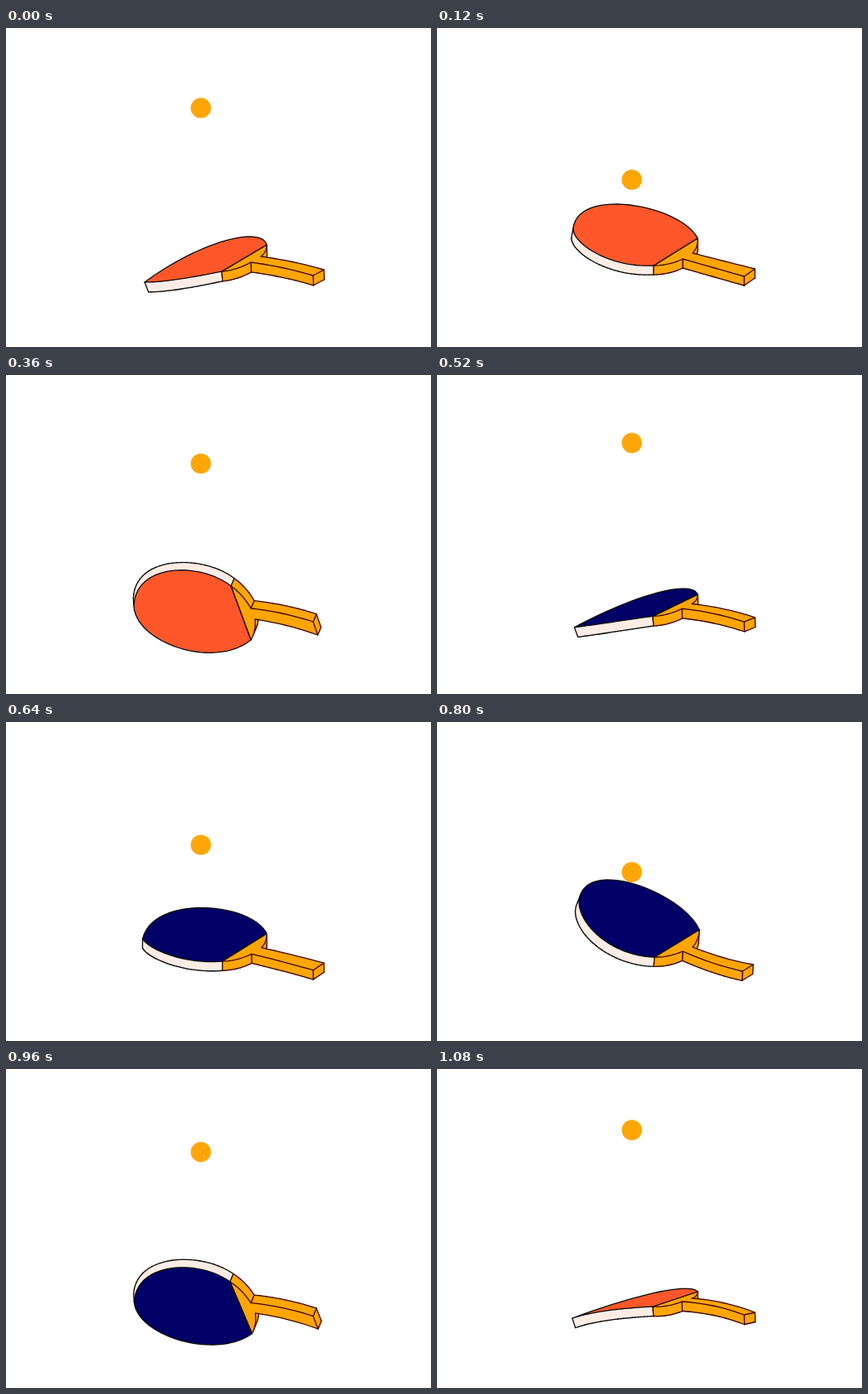
Animation of 512x384 px, one loop 1.12 s. Source, as an HTML page with a canvas:

```html
<!DOCTYPE html>
<html lang="en">
<head>
<meta charset="utf-8">
<title>Paddle and ball</title>
<style>
  html, body { margin: 0; width: 100%; height: 100%; overflow: hidden; background: #fff; }
  canvas { display: block; width: 512px; height: 384px; }
</style>
</head>
<body>
<canvas id="stage" width="512" height="384"></canvas>
<script>
const ctx = document.getElementById('stage').getContext('2d');
const LOOP = 1120, STEP = 40;
const RED = '#ff5729', NAVY = '#020066', WOOD = '#ffa500', RIM = '#fdece4';
const INK = '#0a0a0a', WOOD_INK = '#3c0500';

// A pose: outline of the facing side, walked counterclockwise.
// near joint, near neck, near end | far end, far neck, far joint |
// far curve handles, tip, near curve handles | thickness x, y, lean, handle bow
const flat = [260,286, 295,280, 370,296,  383,293, 307,276, 314,268,
  305,258, 250,268, 163,300, 190,291, 225,288,  .5,11.5, 3, -3];
const low = [260,293, 295,282, 370,298,  383,291, 307,275, 314,261,
  308,238, 235,256, 167,306, 195,306, 235,298,  .5,11.8, 4, -1.5];
const open = [261,286, 296,278, 370,299,  383,290, 308,271, 314,253,
  292,212, 168,191, 164,242, 165,261, 210,289,  0,11, -2, 0];
const high = [262,283, 296,276, 368,300,  381,292, 308,271, 316,250,
  296,205, 176,160, 171,216, 171,246, 213,282,  -.5,11.3, -4, 2];
const front = [287,316, 299,290, 373,309,  375,295, 301,278, 288,246,
  253,208, 154,195, 153,262, 153,322, 238,376,  2,-3, -4, 0];
const over = [295,319, 300,294, 375.5,313,  370,297, 295,281, 271,254,
  234,225, 156,226, 154,278, 156,322, 250,355,  4,-9.3, -4, -2];

const poses = [flat, low, open, high, front, over, flip(flat)];
const swings = [
  { from: 1080, length: 540, hit: 202, times: [0, 40, 160, 260, 350, 400, 540], side: RED, back: NAVY },
  { from: 500, length: 580, hit: 248, times: [0, 40, 180, 300, 390, 450, 580], side: NAVY, back: RED }
];

function point(pose, i) { return [pose[2 * i], pose[2 * i + 1]]; }

function shift(pose, [x, y]) {
  return [x + pose[22] + pose[24] * Math.max(0, 270 - x) / 100, y + pose[23]];
}

// The same paddle described from its other side.
function flip(pose) {
  const order = [5, 4, 3, 2, 1, 0, 10, 9, 8, 7, 6];
  return [...order.flatMap(i => shift(pose, point(pose, i))),
    -pose[22], -pose[23], -pose[24], pose[25]];
}

// Monotone cubic between the key poses.
function poseAt(times, t) {
  let i = 0;
  while (i < times.length - 2 && t >= times[i + 1]) i++;
  const h = times[i + 1] - times[i], s = (t - times[i]) / h;
  return flat.map((_, n) => {
    const slope = j => (poses[j + 1][n] - poses[j][n]) / (times[j + 1] - times[j]);
    const tangent = j => {
      if (j === 0) return slope(0);
      if (j === times.length - 1) return slope(j - 1);
      const a = slope(j - 1), b = slope(j);
      return a * b > 0 ? 2 * a * b / (a + b) : 0;
    };
    const a = poses[i][n], b = poses[i + 1][n], s2 = s * s, s3 = s2 * s;
    return a * (2 * s3 - 3 * s2 + 1) + b * (3 * s2 - 2 * s3)
      + h * (tangent(i) * (s3 - 2 * s2 + s) + tangent(i + 1) * (s3 - s2));
  });
}

function cubic(a, b, c, d, n = 28) {
  return Array.from({ length: n + 1 }, (_, i) => {
    const s = i / n, r = 1 - s;
    return [0, 1].map(k =>
      r * r * r * a[k] + 3 * r * r * s * b[k] + 3 * r * s * s * c[k] + s * s * s * d[k]);
  });
}

function bowed(a, b, ox, oy, n = 10) {
  return Array.from({ length: n + 1 }, (_, i) => {
    const s = i / n, w = 4 * s * (1 - s);
    return [a[0] + (b[0] - a[0]) * s + ox * w, a[1] + (b[1] - a[1]) * s + oy * w];
  });
}

function neck(a, b) {
  const dx = b[0] - a[0], dy = b[1] - a[1], k = 2 / (Math.hypot(dx, dy) || 1);
  return bowed(a, b, -dy * k, dx * k);
}

function trace(pts) {
  ctx.beginPath();
  pts.forEach(([x, y]) => ctx.lineTo(x, y));
}

function line(pts, color) {
  trace(pts);
  ctx.strokeStyle = color;
  ctx.lineWidth = 1.3;
  ctx.stroke();
}

function area(pts) {
  return pts.reduce((sum, [x, y], i) => {
    const [u, v] = pts[(i + 1) % pts.length];
    return sum + x * v - u * y;
  }, 0) / 2;
}

function headCurve(pose) {
  const p = i => point(pose, i);
  return [...cubic(p(5), p(6), p(7), p(8)), ...cubic(p(8), p(9), p(10), p(0)).slice(1)];
}

// The visible part of the edge band along one stretch of outline.
function drawEdge(pose, pts, fill, ink) {
  const outer = pts.map(p => shift(pose, p));
  const seen = pts.slice(1).map((b, i) => {
    const a = pts[i], dx = outer[i][0] - a[0], dy = outer[i][1] - a[1];
    return (b[0] - a[0]) * dy - (b[1] - a[1]) * dx > 0;
  });
  seen.forEach((on, i) => {
    if (!on) return;
    trace([pts[i], pts[i + 1], outer[i + 1], outer[i]]);
    ctx.closePath();
    ctx.fillStyle = ctx.strokeStyle = fill;
    ctx.lineWidth = .5;
    ctx.fill();
    ctx.stroke();
  });
  seen.forEach((on, i) => {
    if (on) line([outer[i], outer[i + 1]], ink);
  });
  pts.forEach((p, i) => {
    if (!!seen[i - 1] !== !!seen[i]) line([p, outer[i]], ink);
  });
}

function drawFace(pts, fill, ink) {
  trace(pts);
  ctx.closePath();
  ctx.fillStyle = fill;
  ctx.fill();
  line([...pts, pts[0]], ink);
}

function drawPaddle(pose, side, back) {
  let head = headCurve(pose);
  if (area(head) > 0) {
    pose = flip(pose);
    head = headCurve(pose);
    side = back;
  }
  const p = i => point(pose, i), bow = pose[25];
  const grip = [
    neck(p(0), p(1)),
    bowed(p(1), p(2), 0, bow),
    [p(2), p(3)],
    bowed(p(3), p(4), 0, bow),
    neck(p(4), p(5))
  ];
  const edges = [...grip.map(pts => [pts, WOOD, WOOD_INK]), [head, RIM, INK]];
  if (pose[23] > 0) edges.reverse();
  edges.forEach(edge => drawEdge(pose, ...edge));
  drawFace(grip.flat(), WOOD, WOOD_INK);
  drawFace(head, side, INK);
}

function ballY(t, { hit, length }) {
  const drop = t < hit
    ? Math.pow(t / hit, 1.13)
    : Math.pow((length - t) / (length - hit), 1.65);
  return 73.5 + 142 * drop;
}

function draw(time) {
  const swing = time >= 500 && time < 1080 ? swings[1] : swings[0];
  const t = (time - swing.from + LOOP) % LOOP;
  ctx.fillStyle = '#fff';
  ctx.fillRect(0, 0, 512, 384);
  ctx.lineJoin = ctx.lineCap = 'round';
  drawPaddle(poseAt(swing.times, t), swing.side, swing.back);
  ctx.beginPath();
  ctx.arc(234.7, ballY(t, swing), 12.2, 0, 2 * Math.PI);
  ctx.fillStyle = '#ffa607';
  ctx.fill();
}

const start = performance.now();
function tick() {
  const time = (performance.now() - start) % LOOP;
  draw(Math.floor(time / STEP) * STEP);
  requestAnimationFrame(tick);
}
tick();
</script>
</body>
</html>
```
